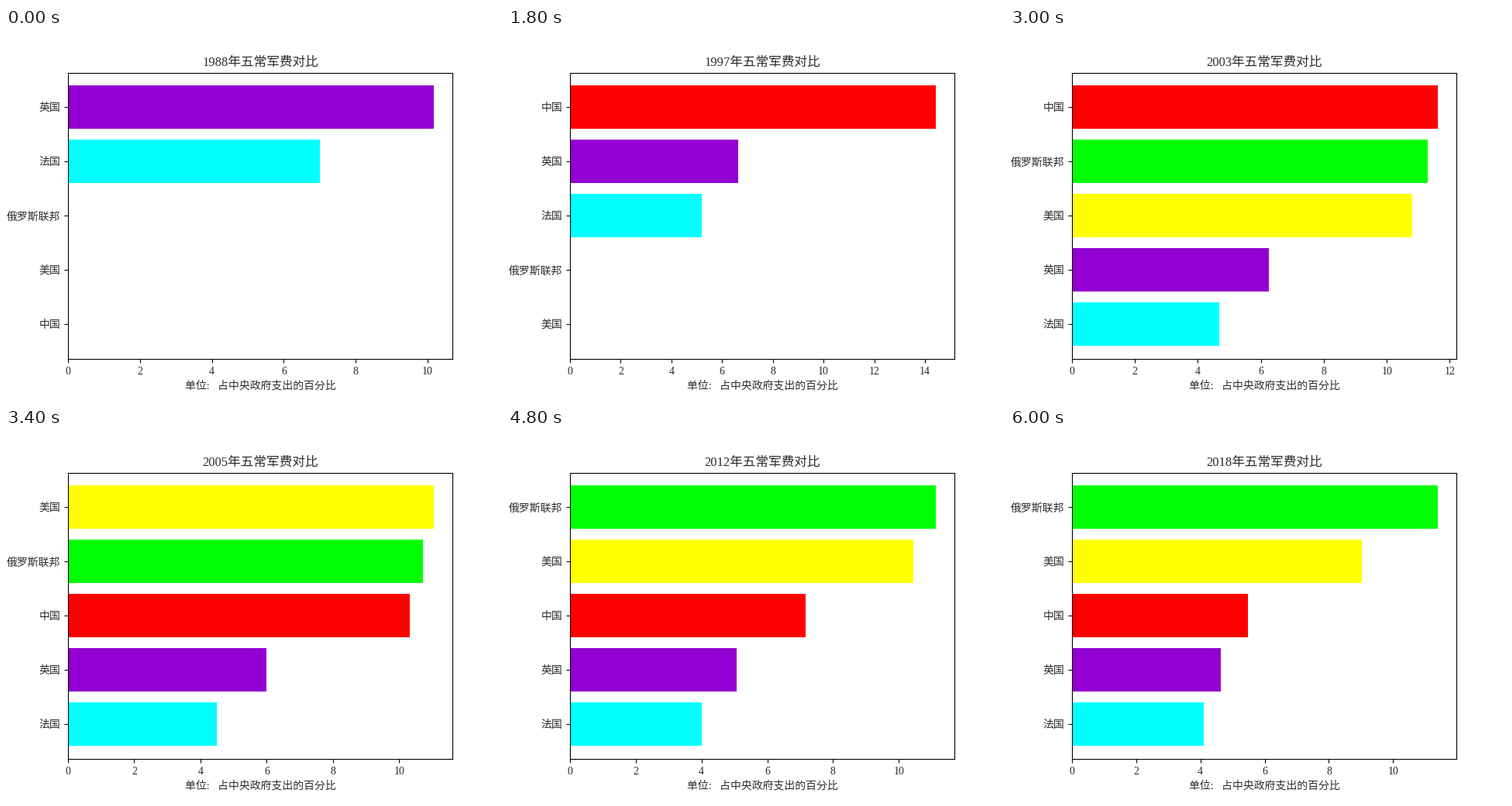
A matplotlib script that plays this animation: 640 by 480 pixels, repeating every 6200 ms.

```python
import numpy as np
import matplotlib.pyplot as plt
from matplotlib.animation import FuncAnimation

INK = "#2b2b2b"
plt.rcParams.update({
    "font.family": ["Liberation Serif", "Noto Sans CJK JP"],
    "text.color": INK,
    "xtick.labelcolor": INK,
    "ytick.labelcolor": INK,
})

FIRST, LAST = 1988, 2018
KEY_YEARS = (1988, 1991, 1997, 2003, 2008, 2014, 2016, 2018)

# name, colour, first year with data, share at each key year
SERIES = [
    ("中国", "red", 1989, (13, 14.47, 14.44, 11.63, 8.36, 6.58, 5.9, 5.48)),
    ("美国", "yellow", 2001, (0, 0, 5.4, 10.81, 11.41, 9.97, 9.4, 9.03)),
    ("俄罗斯联邦", "lime", 1998, (0, 0, 7.2, 11.3, 9.86, 11.77, 14.8, 11.4)),
    ("法国", "cyan", 1988, (7, 6.55, 5.2, 4.67, 4.25, 3.89, 4, 4.1)),
    ("英国", "darkviolet", 1988, (10.18, 9.49, 6.64, 6.25, 5.58, 4.81, 4.65, 4.64)),
]


def share(year, start, values):
    return np.interp(year, KEY_YEARS, values) if year >= start else 0


fig, ax = plt.subplots(figsize=(6.4, 4.8), dpi=100)
fig.text(328 / 640, 1 - 465.5 / 480, "单位:   占中央政府支出的百分比",
         ha="center", va="baseline", fontsize=10)


def draw(i):
    year = FIRST + i
    bars = [(share(year, start, values), name, color)
            for name, color, start, values in SERIES]
    widths, names, colors = zip(*sorted(bars, key=lambda bar: bar[0]))
    rows = range(len(bars))
    ax.clear()
    ax.barh(rows, widths, color=colors)
    ax.set_yticks(rows, names)
    ax.set_title(f"{year}年五常军费对比")


anim = FuncAnimation(fig, draw, frames=LAST - FIRST + 1, interval=200,
                     repeat=True, repeat_delay=0)
plt.show()
```
